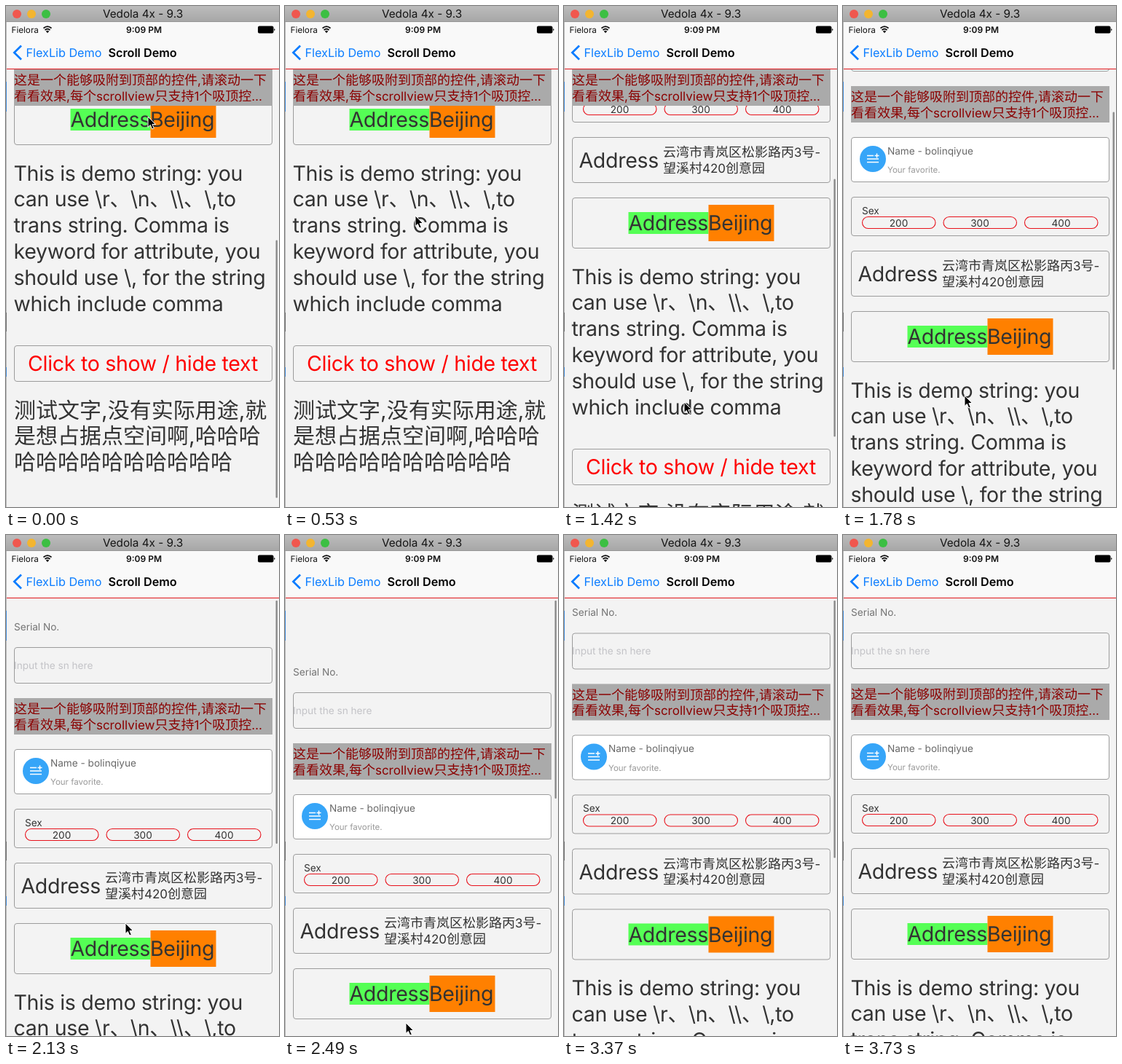
Recreate the animation shown at these times as an HTML page. Size 375x688 px, loop 3.91 s.

```html
<!DOCTYPE html>
<html lang="en">
<head>
<meta charset="utf-8">
<title>Scroll Demo</title>
<style>
html, body { margin: 0; width: 100%; height: 100%; overflow: hidden; background: #f3f3f3; }
svg { display: block; width: 375px; height: 688px; }
text {
  font: 13.6px Inter, "Noto Sans CJK SC", "Noto Sans CJK", sans-serif;
  font-optical-sizing: none; text-rendering: geometricPrecision; fill: #333; white-space: pre;
}
text.big { font-size: 28.5px; letter-spacing: -.29px; }
text.han { font-size: 30px; }
text.mid { font-size: 18px; }
.mid tspan { font-size: 17px; }
text.nav { font-size: 16.2px; }
.center { text-anchor: middle; }
.box { fill: none; stroke: #9c9c9c; }
.pill { fill: none; stroke: #e8121c; stroke-width: 1.1; }
</style>
</head>
<body>
<svg viewBox="0 0 375 688">
  <defs>
    <linearGradient id="metal" x2="0" y2="1">
      <stop stop-color="#bcbcbc"/><stop offset="1" stop-color="#a6a6a6"/>
    </linearGradient>
  </defs>
  <rect width="375" height="688" fill="#f3f3f3"/>

  <g id="page">
    <text x="11" y="130.5" style="fill:#737373">Serial No.</text>
    <rect class="box" x="11.5" y="154.5" width="354" height="49" rx="3.5"/>
    <text x="11" y="183.5" style="fill:#c3c3c7">Input the sn here</text>

    <rect class="box" x="11.5" y="294.5" width="354" height="61" rx="3.5" style="fill:#fff"/>
    <circle cx="41" cy="324" r="18" fill="#36a5f8"/>
    <path d="M33 319.5h9M33 324h16M33 328.5h16M46.5 316.5v6M43.5 319.5h6" stroke="#fff" stroke-width="1.5"/>
    <text x="61" y="317.5" style="fill:#686868">Name - bolinqiyue</text>
    <text x="61" y="343" style="fill:#999;font-size:11.5px">Your favorite.</text>

    <rect class="box" x="11.5" y="376.5" width="354" height="53" rx="3.5"/>
    <text x="26" y="399.5">Sex</text>
    <rect class="pill" x="26.5" y="403.5" width="100.5" height="16" rx="8"/>
    <rect class="pill" x="138" y="403.5" width="100.5" height="16" rx="8"/>
    <rect class="pill" x="249.5" y="403.5" width="100.5" height="16" rx="8"/>
    <g class="center">
      <text x="76.5" y="416.5">200</text>
      <text x="188" y="416.5">300</text>
      <text x="299.5" y="416.5">400</text>
    </g>

    <rect class="box" x="11.5" y="450.5" width="354" height="62" rx="3.5"/>
    <text class="big" x="20.5" y="492">Address</text>
    <text class="mid" x="136" y="477.3">云湾市青岚区松影路丙<tspan>3</tspan>号<tspan>-</tspan></text>
    <text class="mid" x="136" y="498.8">望溪村<tspan>420</tspan>创意园</text>

    <rect class="box" x="11.5" y="533.5" width="354" height="69" rx="3.5"/>
    <rect x="88.5" y="553" width="110" height="30" fill="#55ff55"/>
    <rect x="198.5" y="543" width="90" height="50" fill="#ff8000"/>
    <text class="big" x="88.5" y="578.2">Address</text>
    <text class="big" x="198" y="578.2">Beijing</text>

    <text class="big" x="10.5" y="651.5">This is demo string: you</text>
    <text class="big" x="10.5" y="687.3">can use \r、\n、\\、\,to</text>
    <text class="big" x="10.5" y="723.1">trans string. Comma is</text>
    <text class="big" x="10.5" y="758.9">keyword for attribute, you</text>
    <text class="big" x="10.5" y="794.7">should use \, for the string</text>
    <text class="big" x="10.5" y="830.5">which include comma</text>

    <rect class="box" x="11.5" y="878.5" width="354" height="49" rx="3.5"/>
    <text class="big center" x="188" y="913.3" style="fill:#f00">Click to show / hide text</text>

    <text class="han" x="11" y="977.5">测试文字,没有实际用途,就</text>
    <text class="han" x="11" y="1013.4">是想占据点空间啊,哈哈哈</text>
    <text class="han" x="11" y="1049.3">哈哈哈哈哈哈哈哈哈哈</text>
  </g>

  <g id="sticky">
    <rect x="11" width="355" height="50" fill="#aaa"/>
    <text class="mid" x="11" y="21.4" style="fill:#8b0000">这是一个能够吸附到顶部的控件<tspan>,</tspan>请滚动一下</text>
    <text class="mid" x="11" y="42.9" style="fill:#8b0000">看看效果<tspan>,</tspan>每个<tspan>scrollview</tspan>只支持<tspan>1</tspan>个吸顶控<tspan>…</tspan></text>
  </g>
  <rect id="bar" x="370.5" width="2.5" rx="1.25" fill="#8e8e8e"/>

  <g id="header">
    <rect y="22" width="375" height="64" fill="#f9f9f9"/>
    <rect y="86" width="375" height="1" fill="#e0141a"/>
    <rect width="375" height="22" fill="url(#metal)"/>
    <rect y="21" width="375" height="1" fill="#979797"/>
    <circle cx="15" cy="11" r="6" fill="#f0574e"/>
    <circle cx="35" cy="11" r="6" fill="#f3b530"/>
    <circle cx="55" cy="11" r="6" fill="#3cbf43"/>
    <text class="center" x="188" y="16" style="font-size:15.3px;fill:#151515">Vedola 4x - 9.3</text>

    <text x="7.5" y="36.5" style="font-size:11.7px;fill:#111">Fielora</text>
    <g fill="none" stroke="#111" stroke-width="1.7">
      <path d="M51.5 30.5q5.5-4.600 11 0M53.5 33q3.5-3 7 0"/>
    </g>
    <path d="M57 37.2l-2.3-2.6q2.3-1.700 4.600 0z" fill="#111"/>
    <text class="center" x="189.5" y="36.5" style="font-size:12px;font-weight:600;fill:#111">9:09 PM</text>
    <rect x="346" y="27.5" width="21.5" height="10" rx="2" fill="#000"/>
    <path d="M368.2 31v3q1.300-.3 1.300-1.500t-1.300-1.500" fill="#111"/>

    <path d="M21 54.5L11.3 64l9.700 9.5" fill="none" stroke="#0a7cff" stroke-width="2.7"/>
    <text class="nav" x="27.5" y="69.6" style="fill:#0a7cff">FlexLib Demo</text>
    <text class="nav" x="140.5" y="69.6" style="fill:#000;font-weight:600">Scroll Demo</text>
  </g>

  <path d="M.5 22v666" stroke="#bdbdbd"/>
  <path d="M.5 104v41M.5 496v13" stroke="#4a90dc"/>
  <path d="M.5 421v26" stroke="#777"/>

  <path id="cursor" d="M0 0V14.5L3.3 11.4 5.7 17 8.3 15.9 5.9 10.5H10.5Z" fill="#000" stroke="#fff" stroke-linejoin="round"/>
</svg>

<script>
const LOOP = 3910;
const NAV_END = 87, STICKY_Y = 224;
const MIN = 20, MAX = 430;
const BAR_TOP = 90, BAR_END = 686, BAR_LEN = 354;

// time, scroll offset, pointer x and y (null when outside)
const steps = [
  [0, 412, 195, 152],
  [350, 412, 183, 250],
  [530, 412, 179, 288],
  [710, 441, 182, 247],
  [880, 464, 187, 206],
  [1060, 430, 170, 385],
  [1420, 270, 165, 544],
  [1600, 114, 166, 590],
  [1780, 114, 167, 535],
  [1950, 40, 166, 590],
  [2130, 0, 164, 533],
  [2310, -33, 165, 602],
  [2490, -62, 166, 670],
  [3020, 0.5, 235, 672],
  [3200, 17, null],
  [3370, 19.5, null],
  [3550, 20, null]
];
const barHidden = t => (t >= 530 && t < 710) || t >= 3730;

const [page, sticky, bar, cursor] =
  ['page', 'sticky', 'bar', 'cursor'].map(id => document.getElementById(id));
const move = (el, x, y) => el.setAttribute('transform', `translate(${x} ${y})`);
const show = (el, on) => el.setAttribute('visibility', on ? 'visible' : 'hidden');

// The indicator shrinks by the distance scrolled past either end.
function drawBar(scroll) {
  const inside = Math.min(MAX, Math.max(MIN, scroll));
  const over = scroll - inside;
  const travel = BAR_END - BAR_TOP - BAR_LEN;
  const top = BAR_TOP + travel * (inside - MIN) / (MAX - MIN) + Math.max(0, over);
  bar.setAttribute('y', top);
  bar.setAttribute('height', BAR_LEN - Math.abs(over));
}

function draw(t) {
  const [, scroll, x, y] = steps.findLast(step => step[0] <= t);
  move(page, 0, -scroll);
  move(sticky, 0, Math.max(NAV_END, STICKY_Y - scroll));
  drawBar(scroll);
  show(bar, !barHidden(t));
  show(cursor, x !== null);
  if (x !== null) move(cursor, x, y);
}

const start = performance.now();
function tick() {
  draw((performance.now() - start) % LOOP);
  requestAnimationFrame(tick);
}
tick();
</script>
</body>
</html>
```
